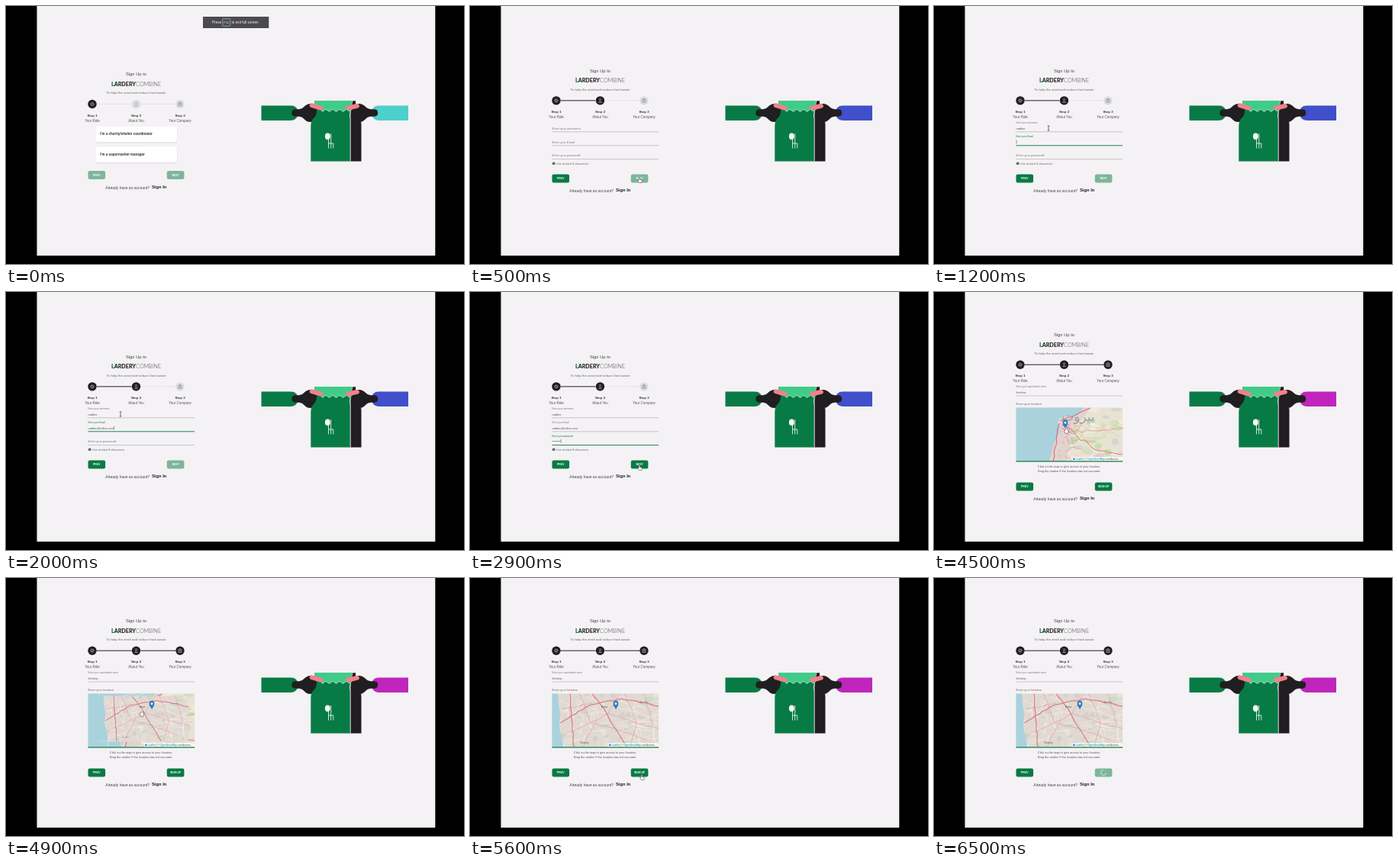
Write an HTML page that moves like this. It is 600 px wide and 338 px high and loops after 6.6 s.

```html
<!DOCTYPE html>
<html lang="en">
<head>
<meta charset="utf-8">
<title>Sign up flow</title>
<style>
html,body{margin:0;width:100%;height:100%;overflow:hidden;background:#000}
svg{display:block;width:100vw;height:100vh}
text{font-family:"Liberation Sans",Arial,sans-serif}
.brand{font-family:Lato,sans-serif}
</style>
</head>
<body>
<svg id="stage" viewBox="0 0 600 338"></svg>
<script>
const GREEN = '#087a45', PALE = '#7db69a', DARK = '#201e21', LOOP = 6600;
const EMAIL = 'nadine@mbox.test', USER = 'nadine', SHOP = 'fernlow';

let seed = 11;
const rand = () => (seed = (seed * 16807) % 2147483647) / 2147483647;
const between = (a, b) => a + (b - a) * rand();
const times = (n, fn) => Array.from({length: n}, (_, i) => fn(i)).join('');

const text = (x, y, size, str, fill = '#555', extra = '') =>
  `<text x="${x}" y="${y}" font-size="${size}" fill="${fill}" ${extra}>${str}</text>`;
const rect = (x, y, w, h, fill, extra = '') =>
  `<rect x="${x}" y="${y}" width="${w}" height="${h}" fill="${fill}" ${extra}/>`;
const path = (d, fill = 'none', extra = '') => `<path d="${d}" fill="${fill}" ${extra}/>`;
const line = (d, color, width, extra = '') =>
  path(d, 'none', `stroke="${color}" stroke-width="${width}" stroke-linejoin="round" ${extra}`);
const MID = 'text-anchor="middle"', BOLD = 'font-weight="700"';

// A road between two points that wanders a little.
function road(x1, y1, x2, y2, color, width, wobble = 2) {
  const n = Math.max(3, Math.round(Math.hypot(x2 - x1, y2 - y1) / 6));
  let d = `M${x1} ${y1}`;
  for (let i = 1; i <= n; i++) {
    const k = i / n, j = i < n ? wobble : 0;
    d += `L${(x1 + (x2 - x1) * k + between(-j, j)).toFixed(1)} ${(y1 + (y2 - y1) * k + between(-j, j)).toFixed(1)}`;
  }
  return line(d, color, width);
}

function patches(n, x1, x2, colors, size) {
  return times(n, i => `<ellipse cx="${between(x1, x2).toFixed(1)}" cy="${between(151, 222).toFixed(1)}"
    rx="${between(size / 3, size).toFixed(1)}" ry="${between(size / 4, size * .7).toFixed(1)}" fill="${colors[i % colors.length]}"/>`);
}

function countryMap() {
  const coast = y => 162 - (y - 151) * .32;
  return rect(107, 151, 141, 72, '#f2ebdc')
    + path('M205 222L228 184L248 172V222Z', '#f4ead0')
    + patches(26, 152, 225, ['#dfe6c9', '#f5f0e6', '#e8ddd0'], 9)
    + path('M107 151H163L161 163L157 168L156 180L152 186L150 199L145 207L141 222H107Z', '#a9d2dd')
    + line('M133.2 151V222', '#e6f0f2', .8)
    + line('M151 151Q147 172 137 188T124 222', '#9a8fb5', .5, 'stroke-dasharray="2 1"')
    + line('M126 151Q118 181 108 196', '#9a8fb5', .4, 'stroke-dasharray="2 1"')
    + times(22, () => {
        const y = between(152, 219), x = coast(y) + between(2, 24);
        return road(x, y, x + between(12, 42), y + between(-20, 20), rand() < .5 ? '#df7f8c' : '#edb09e', between(.35, .8));
      })
    + road(161, 152, 144, 219, '#d95a73', .9, 1.2)
    + road(163, 168, 248, 159, '#dc7b83', .7)
    + road(153, 187, 248, 215, '#dc7b83', .7)
    + road(218, 151, 184, 221, '#df8a85', .7)
    + road(233, 151, 207, 181, '#8d6b9d', .7, 3)
    + road(207, 181, 171, 196, '#8d6b9d', .7, 3)
    + road(171, 196, 163, 222, '#8d6b9d', .7, 2)
    + text(190, 175, 3, 'Lebanon', '#76528a', MID) + text(159, 164, 2.6, 'Tripoli', '#666')
    + text(157, 188, 2.8, 'Beirut', '#444') + text(205, 205, 2.8, 'Damascus', '#555');
}

function coastMap() {
  return rect(107, 151, 141, 72, '#e7e3d2')
    + patches(34, 172, 248, ['#c6ddb1', '#d7e1bd', '#efe9df', '#d9d5cd'], 9)
    + path('M150 222L153 195L163 181L163 167L186 162L194 151H205L196 165L182 174L174 222Z', '#e2d3cf')
    + path('M107 151H196L190 159L184 164L172 163L164 166L162 171L165 177L163 188L157 198L154 210L151 222H107Z', '#a9d2dd')
    + times(28, () => {
        const y = between(165, 221), x = between(164, 186);
        return road(x, y, x + between(-6, 16), y + between(-10, 10), '#e58a9e', .6, 1);
      })
    + times(18, () => {
        const x = between(178, 238), y = between(158, 220);
        return road(x, y, x + between(5, 28), y + between(-13, 13), rand() < .5 ? '#fff' : '#eab8a4', .6, 2);
      })
    + road(164, 172, 156, 222, '#e0697f', 1.1, 1)
    + road(166, 169, 205, 152, '#e0697f', 1.1, 1)
    + road(168, 174, 212, 207, '#dd6f82', 1, 2)
    + road(212, 207, 248, 213, '#dd6f82', .9, 2)
    + road(175, 183, 248, 179, '#e29a8a', .8, 2)
    + text(189, 169, 17, 'بيروت', '#77798a', `${MID} opacity=".6" style="font-family:'DejaVu Sans',sans-serif"`);
}

function cityMap() {
  const major = [[131, 151, 136, 222], [160, 151, 178, 176], [178, 176, 190, 197], [190, 197, 206, 222],
    [118, 190, 158, 166], [158, 166, 199, 158], [199, 158, 248, 168]];
  const minor = [[120, 172, 160, 164], [122, 206, 166, 186], [166, 186, 181, 178], [148, 222, 166, 186], [144, 151, 158, 190],
    [178, 176, 218, 190], [218, 190, 248, 198], [190, 197, 232, 213], [203, 151, 218, 190], [218, 190, 210, 222],
    [228, 151, 240, 193], [181, 178, 196, 151], [158, 190, 190, 197]];
  return rect(107, 151, 141, 72, '#e0d9d2')
    + patches(44, 120, 248, ['#d5cfc8', '#cadcba', '#e8e3dd', '#d8cfcc', '#dfd8cf'], 6)
    + times(75, () => {
        const x = between(119, 244), y = between(151, 220), turn = between(-.35, .5) + (rand() < .5 ? Math.PI / 2 : 0), len = between(9, 28);
        return road(x, y, x + len * Math.cos(turn), y + len * Math.sin(turn), '#f8f3ef', .6, .6);
      })
    + path('M107 151H115L116 165L118 178L117 194L120 209L122 222H107Z', '#a9d2dd')
    + minor.map(p => road(...p, '#eaa8b1', .9, .9)).join('')
    + major.map(p => road(...p, '#df7788', 1.2, .8)).join('')
    + text(176, 170, 3.2, 'Beirut', '#555', MID) + text(150, 217, 2.8, 'Ghobeiry', '#555', MID)
    + text(228, 164, 2.8, 'Sin el Fil', '#666', MID);
}

function stepIcons() {
  const xs = [113, 170.5, 228], names = ['Your Role', 'About You', 'Your Company'];
  const glyphs = [
    '<circle r="1.6" fill="none" stroke="#aaa" stroke-width=".9"/><circle r="2.3" fill="none" stroke="#aaa" stroke-width=".7" stroke-dasharray=".8 1"/>',
    '<g fill="none" stroke="#aaa" stroke-width=".7"><circle cy="-1.3" r="1.2"/><path d="M-2 2.5Q0-.7 2 2.5Z"/></g>',
    '<g fill="none" stroke="#999" stroke-width=".8"><rect x="-2" y="-1.3" width="4" height="3.6"/><path d="M-1-1.3V-2.4H1V-1.3M-2 .5H2"/></g>'];
  return xs.map((x, i) =>
    (i ? `<path id="bar${i}" d="M${xs[i - 1] + 6} 128.5H${x - 6}"/>` : '')
    + `<circle id="dot${i}" cx="${x}" cy="128.5" r="5.7"/><g transform="translate(${x} 128.5)">${glyphs[i]}</g>`
    + text(x, 144.8, 4.4, `Step ${i + 1}`, '#333', `${MID} ${BOLD}`)
    + text(x, 151.8, 4.5, names[i], '#555', MID)).join('');
}

const field = (id, name, labelY, valueY, ruleY) =>
  `<text id="${id}Label" x="107.5" data-top="${labelY}" data-rest="${valueY}">Enter your ${name}</text>`
  + text(107.5, valueY, 4, '', '#555', `id="${id}Value"`)
  + `<path id="${id}Rule" d="M107.5 ${ruleY}H247"/>`
  + `<path id="${id}Caret" d="M0 ${valueY - 4}V${valueY + .8}" stroke="#333" stroke-width=".5"/>`;

const button = (id, x, label) => rect(x, 216, 22.6, 11, PALE, `rx="2.2" id="${id}Box"`)
  + text(x + 11.3, 222.8, 3.5, label, '#fff', `${MID} ${BOLD} id="${id}Text"`);

const card = (y, label, id = '') => rect(116.8, y + .8, 107.8, 21.6, '#00000012', 'rx="3.5"')
  + rect(116.8, y, 107.6, 21.2, '#fff', `rx="3" stroke="#e3e1e4" stroke-width=".4" ${id}`)
  + text(123.3, y + 12.1, 4.5, label, '#333', BOLD);

function bag() {
  const finger = (x, y, turn) => rect(-9, -3, 18, 6, '#f4808a', `rx="3" transform="translate(${x} ${y}) rotate(${turn})"`);
  const arm = path('M379 135.3H384Q388 135 391 131.5Q395 127.5 400 128Q409 129 409 140T399 152Q394 152 391 148.5Q388 145 384 144.7H379Q374.3 144.5 374.3 140T379 135.3Z', DARK);
  return path('M334.5 130.5H373Q382.5 130.5 382.5 140T373 150H334.5Z', GREEN)
    + path('M527 130.5H488.5Q479 130.5 479 140T488.5 150H527Z', '#4dd0ca', 'id="sleeve"')
    + arm + `<g transform="translate(861.5 0) scale(-1 1)">${arm}</g>`
    + path('M454.3 124.2H458V137Q459 144 463 147Q465.5 150 465.5 156V203.5H451V137Z', DARK)
    + path('M407 128H451V137Q449.5 143 451 149V203.5H399.3V157Q399.5 150 403 147Q407 143 407 137Z', GREEN)
    + line('M451.5 137Q450.5 143 451.2 149V203.5', '#f4f2f4', .9)
    + path('M404 124H453.5V136L450 138.4L446 135.2L441.5 138.4L437 135.2L432.5 138.4L428 135.2L423.5 138.4L419 135.2L414.5 138.4L411 133.5L404 132Z', '#41cb88')
    + line('M413 135.4L414.5 138.4L419 135.2L423.5 138.4L428 135.2L432.5 138.4L437 135.2L441.5 138.4L446 135.2L450 138', '#d8f3e5', .7)
    + finger(406.5, 132, 17) + finger(454, 132.3, -13)
    + '<ellipse cx="421.3" cy="170.8" rx="3.4" ry="4.2" fill="#fff"/>'
    + line('M422.5 174V186.5M425.7 167V186.5M422.5 180H428.8V186.5', '#fff', .8);
}

const hand = 'M-1.2 0Q0-1.2.9 0V3.2L4 4Q5 4.4 4.6 6L3.9 8.6H-.7L-3.4 5.2Q-3.6 4-2.2 4.2L-1.2 5Z';
const cursors = {
  pointer: path(hand, '#fff', 'stroke="#333" stroke-width=".7" transform="scale(.75)"'),
  beam: line('M-1.3-3H1.3M0-3V3M-1.3 3H1.3', '#333', .7),
  grab: path('M-2.2-1.5Q-1.5-3-.7-2Q0-3.4.8-2Q1.8-3 2.2-1.5L2.6 1.2L1.6 3.3H-1.3L-3.2.7Q-3-.4-2-.1Z', '#fff', 'stroke="#333" stroke-width=".6"')
};

const stage = document.getElementById('stage');
stage.innerHTML =
  '<defs><clipPath id="mapClip"><rect x="107.5" y="151.5" width="139.7" height="70"/></clipPath></defs>'
  + rect(0, 0, 600, 338, '#000') + rect(40.5, 0, 521.8, 327, '#f4f2f4') + bag()
  + '<g id="head">'
  + text(170.5, 91.3, 5.8, 'Sign Up to', '#444', MID)
  + `<text class="brand" x="170.5" y="105" font-size="7.2" text-anchor="middle" fill="#222"><tspan font-weight="900" fill="${GREEN}">L</tspan><tspan font-weight="800">ARDERY</tspan><tspan font-weight="300" fill="#444">COMBINE</tspan></text>`
  + text(170.5, 115.2, 4.4, 'To help the word and reduce food waste', '#666', MID)
  + stepIcons() + '</g>'
  + '<g id="page0">' + card(157.3, "I'm a charity/shelter coordinator") + card(183.8, "I'm a supermarket manager", 'id="choice"') + '</g>'
  + '<g id="page1">' + field('user', 'username', 154, 161.7, 164.8) + field('mail', 'Email', 172, 179.6, 182.8)
  + field('pass', 'password', 190, 196.8, 200.6)
  + '<circle cx="109.7" cy="206.3" r="1.9" fill="#555"/>' + line('M109.7 206V207.3M109.7 205.1V205.4', '#fff', .5)
  + text(113.3, 207.5, 3.75, 'Use at least 8 characters.', '#666') + '</g>'
  + '<g id="page2">' + field('shop', 'supermarket name', 125.3, 132.6, 136)
  + text(107.5, 147.6, 4, 'Enter your location', '#666')
  + '<g clip-path="url(#mapClip)">'
  + [countryMap, coastMap, cityMap].map((fn, i) => `<g id="map${i}">${fn()}</g>`).join('')
  + '<g id="pin">' + path('M0 0L-2.8-4.8Q-4-10.4 0-10.4T2.8-4.8Z', '#2a81cb', 'stroke="#1f669f" stroke-width=".5"')
  + '<circle cy="-6.8" r="1.4" fill="#fff"/></g>'
  + rect(180.5, 216.2, 67, 6, '#ffffffcc') + rect(182, 217.7, 2.7, 2.2, '#4c7be1')
  + text(186, 220.1, 3.2, '<tspan fill="#0078a8">Leaflet</tspan> | © <tspan fill="#0078a8">OpenStreetMap</tspan> contributors', '#444')
  + '</g>' + line('M107.5 221.8H247.2', GREEN, 1.2)
  + text(177, 230.4, 3.85, 'Click on the map to give access to your location.', '#555', MID)
  + text(177, 236.4, 3.85, 'Drag the marker if the location was not accurate.', '#555', MID) + '</g>'
  + '<g id="foot">' + button('prev', 107.5, 'PREV') + button('next', 210.8, 'NEXT')
  + '<g id="spin">' + line('M0-3.4A3.4 3.4 0 1 0 3.4 0', '#e4f2ea', .8) + '</g>'
  + text(130.3, 239.5, 5, 'Already have an account?', '#444') + text(191, 239, 5.8, 'Sign In', '#222', BOLD) + '</g>'
  + '<g id="banner">' + rect(258, 14, 86.3, 15, '#4b4a50')
  + text(270, 23.3, 4.8, 'Press', '#f2f2f2') + rect(283.7, 16.7, 10, 9.6, 'none', 'stroke="#9cc3e6" stroke-width=".7" rx="1"')
  + text(288.7, 23.2, 4.3, 'F11', '#dcecf8', MID) + text(295.5, 23.3, 4.7, 'to exit full screen', '#f2f2f2') + '</g>'
  + '<g id="cursor">' + Object.entries(cursors).map(([k, v]) => `<g id="${k}">${v}</g>`).join('') + '</g>';

const $ = id => document.getElementById(id);
const set = (id, attrs) => { for (const k in attrs) $(id).setAttribute(k, attrs[k]); };
const show = (id, on) => set(id, {display: on ? 'inline' : 'none'});
const clamp = (t, a, b) => Math.min(1, Math.max(0, (t - a) / (b - a)));
const typed = (str, t, a, b) => str.slice(0, Math.floor(str.length * clamp(t, a, b) + .001));

const moves = [[100, 175, 208, 'pointer'], [200, 163, 196, 'pointer'], [400, 222, 223, 'pointer'], [500, 222, 225, 'pointer'],
  [700, 150, 160, 'beam'], [2000, 150, 160, 'beam'], [2200, 153, 196, 'beam'], [2500, 160, 198, 'beam'],
  [2800, 222, 227, 'pointer'], [3000, 222, 227, 'pointer'], [3200, 150, 131, 'beam'], [3600, 150, 131, 'beam'],
  [3900, 216.5, 192, 'grab'], [4200, 190, 187, 'grab'], [4500, 173.5, 182, 'grab'], [4900, 178, 178, 'grab'],
  [5200, 191, 174, 'grab'], [5500, 225, 258, 'pointer'], [6000, 225, 258, 'pointer']];

function drawCursor(t) {
  const i = moves.findIndex(m => m[0] > t);
  show('cursor', i > 0);
  if (i < 1) return;
  const [a, b] = [moves[i - 1], moves[i]], k = clamp(t, a[0], b[0]), e = k * k * (3 - 2 * k);
  set('cursor', {transform: `translate(${a[1] + (b[1] - a[1]) * e} ${a[2] + (b[2] - a[2]) * e})`});
  Object.keys(cursors).forEach(name => show(name, name === a[3]));
}

function drawField(id, value, focused, t) {
  const label = $(id + 'Label'), up = focused || value;
  label.setAttribute('y', up ? label.dataset.top : label.dataset.rest);
  set(id + 'Label', {'font-size': up ? 3 : 4, fill: focused ? GREEN : '#777'});
  $(id + 'Value').textContent = value;
  set(id + 'Rule', {stroke: focused ? GREEN : '#999', 'stroke-width': focused ? .9 : .5});
  const width = value ? $(id + 'Value').getComputedTextLength() : 0;
  set(id + 'Caret', {transform: `translate(${108 + width} 0)`});
  show(id + 'Caret', focused && t % 400 < 300);
}

function drawMap(t) {
  const level = t < 4100 ? 0 : t < 4900 ? 1 : 2;
  const [x, y] = [[163, 178], [172, 178], [191, 171.5]][level];
  const zoom = level ? .75 + .25 * clamp(t, level === 1 ? 4000 : 4800, level === 1 ? 4300 : 5100) : 1;
  [0, 1, 2].forEach(i => show('map' + i, i === level || i === level - 1 && zoom < 1));
  set('map' + level, {transform: `translate(${x} ${y}) scale(${zoom}) translate(${-x} ${-y})`});
  show('pin', level > 0);
  set('pin', {transform: `translate(${x} ${y})`});
}

function draw(t) {
  const step = t < 500 ? 0 : t < 3000 ? 1 : 2, busy = t >= 5900;
  set('head', {transform: `translate(0 ${[0, -4.6, -33.3][step]})`});
  set('foot', {transform: `translate(0 ${[0, 4.4, 33.4][step]})`});
  [0, 1, 2].forEach(i => {
    show('page' + i, i === step);
    set('dot' + i, {fill: i <= step ? DARK : '#dddce0'});
    if (i) set('bar' + i, {stroke: i <= step ? DARK : '#dad8dc', 'stroke-width': i <= step ? 1 : .6});
  });
  set('sleeve', {fill: ['#4dd0ca', '#414fca', '#c026bd'][step]});
  set('banner', {opacity: 1 - clamp(t, 100, 400)});
  set('choice', {stroke: t >= 200 ? GREEN : '#e3e1e4'});

  drawField('user', typed(USER, t, 700, 1100), t >= 700 && t < 1200, t);
  drawField('mail', typed(EMAIL, t, 1200, 2000), t >= 1200 && t < 2100, t);
  drawField('pass', typed('••••••••', t, 2100, 2600), t >= 2100, t);
  drawField('shop', typed(SHOP, t, 3200, 3700), t >= 3200 && t < 4000, t);
  drawMap(t);

  const ready = [t >= 200, t >= 2600, t >= 4200 && !busy][step];
  set('prevBox', {fill: step ? GREEN : PALE});
  set('nextBox', {fill: ready ? GREEN : PALE});
  $('nextText').textContent = step === 2 ? 'SIGN UP' : 'NEXT';
  show('nextText', !busy);
  show('spin', busy);
  set('spin', {transform: `translate(222 221.5) rotate(${(t - 6500) * .45})`});
  drawCursor(t);
}

const start = performance.now();
function tick() {
  const t = (performance.now() - start) % LOOP;
  draw(Math.floor(t / 100) * 100);
  requestAnimationFrame(tick);
}
tick();
</script>
</body>
</html>
```
